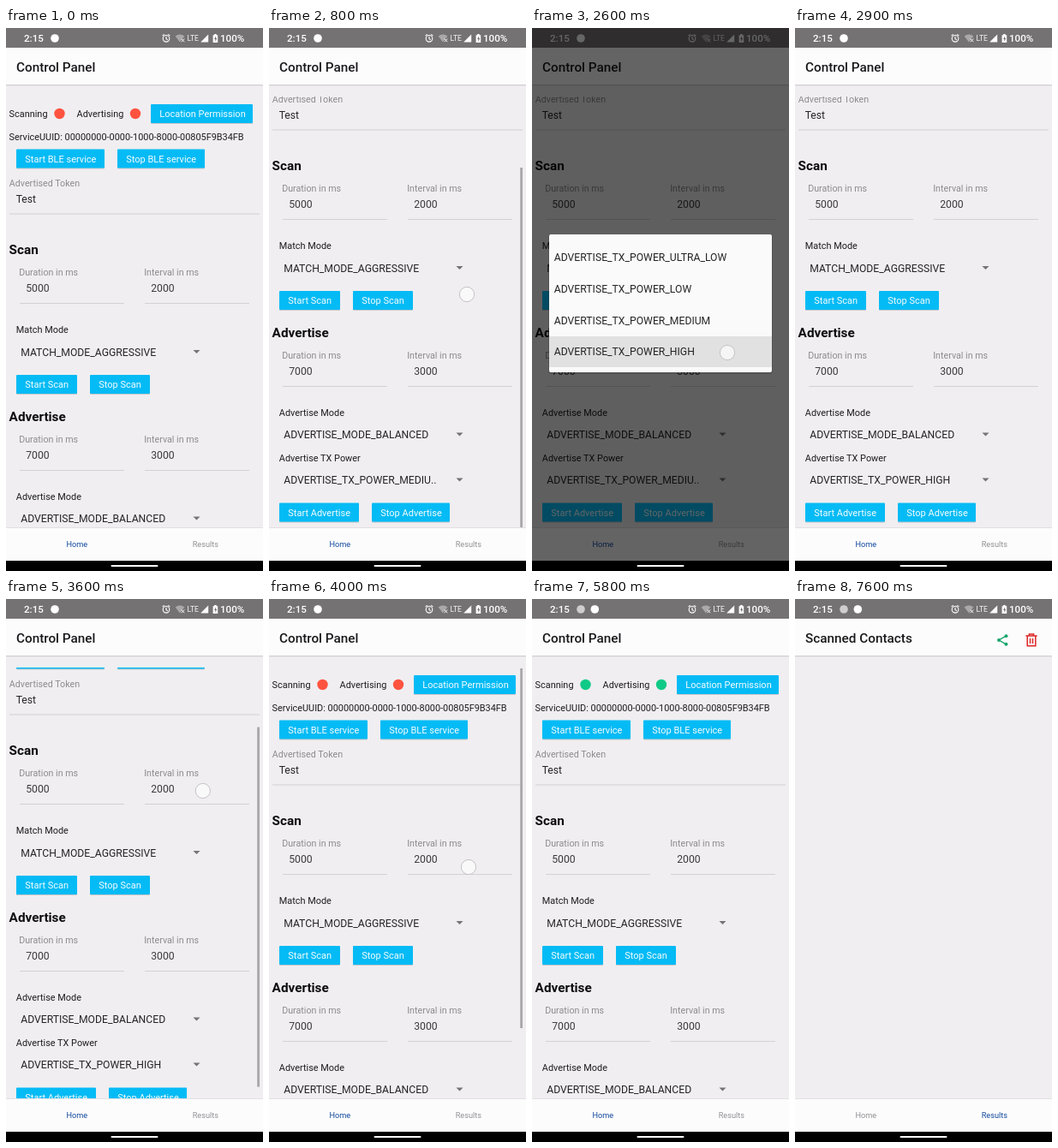
Animation, 300 px wide and 634 px high, one loop 8000 ms. Source, as an HTML page:

```html
<!DOCTYPE html>
<html lang="en">
<head>
<meta charset="utf-8">
<title>Control Panel</title>
<style>
  html, body { margin: 0; width: 100%; height: 100%; overflow: hidden; background: #f0eef1; }
  svg { display: block; width: 300px; height: 634px; font-family: Roboto, sans-serif; }
  text { white-space: pre; }
  .body { font-size: 10.9px; fill: #1d1c1d; }
  .hint { font-size: 10.7px; fill: #8d8b8e; }
  .value { font-size: 12.2px; fill: #262526; }
  .field { font-size: 12.2px; fill: #3c3b3d; }
  .head { font-size: 15.3px; font-weight: 700; fill: #0c0c0d; }
  .title { font-size: 15.3px; font-weight: 500; fill: #19181a; }
  .btn { font-size: 11px; fill: #f6fcff; }
  .nav { font-size: 9.2px; text-anchor: middle; }
  .clock { font-size: 11.6px; font-weight: 500; fill: #fff; }
</style>
</head>
<body>
<svg id="stage" viewBox="0 0 300 634"></svg>
<script>
const LOOP = 8000, STEP = 100, MAX_SCROLL = 98;
const $ = id => document.getElementById(id);

// markup helpers
const text = (cls, x, y, str, id = '') => `<text class="${cls}" x="${x}" y="${y}" id="${id}">${str}</text>`;
const rect = (x, y, w, h, fill, more = '') =>
  `<rect x="${x}" y="${y}" width="${w}" height="${h}" fill="${fill}" ${more}/>`;
const circle = (x, y, r, fill, more = '') => `<circle cx="${x}" cy="${y}" r="${r}" fill="${fill}" ${more}/>`;
const path = (d, more) => `<path d="${d}" ${more}/>`;
const line = (x, y, w) => rect(x, y, w, 1, '#d3d1d4');
const arrow = y => path(`M218.5 ${y - 2}h8l-4 4z`, 'fill="#747275"');
const button = (x, y, w, str, pad = 10.3) =>
  rect(x, y + 1, w, 22, '#000', 'rx="1" opacity=".17"') +
  rect(x, y, w, 22, '#05bbf5', 'rx="1"') + text('btn', x + pad, y + 15, str);
const fields = (y, a, b) => [[15.2, 'Duration in ms', a], [161.2, 'Interval in ms', b]].map(([x, label, val]) =>
  text('hint', x, y, label) + text('field', x + 8, y + 19.4, val) + line(x + .8, y + 32, 122)).join('');
const select = (y, label, val, id) =>
  text('body', 11.8, y, label) + text('value', 17.2, y + 26.6, val, id) + arrow(y + 22);

const form =
  text('body', 3.6, 104, 'Scanning') + circle(62.5, 100, 6.2, '', 'class="dot"') +
  text('body', 82.6, 104, 'Advertising') + circle(151, 100, 6.2, '', 'class="dot"') +
  button(169, 89, 119, 'Location Permission') +
  text('body', 3.6, 131, 'ServiceUUID: 00000000-0000-1000-8000-00805F9B34FB') +
  button(12, 141.5, 103, 'Start BLE service') + button(130, 141.5, 102, 'Stop BLE service') +
  rect(12, 141.5, 103, 22, '#fff', 'id="press"') +
  text('hint', 3.8, 185, 'Advertised Token') + text('value', 11.7, 204.4, 'Test') + line(4, 216.5, 292) +
  text('head', 3.6, 263.5, 'Scan') + fields(289, '5000', '2000') +
  select(356, 'Match Mode', 'MATCH_MODE_AGGRESSIVE') +
  button(12, 405, 71, 'Start Scan') + button(98, 405, 70, 'Stop Scan') +
  text('head', 3.6, 458.5, 'Advertise') + fields(484, '7000', '3000') +
  select(550.5, 'Advertise Mode', 'ADVERTISE_MODE_BALANCED') +
  select(603.5, 'Advertise TX Power', '', 'power') +
  button(12, 652.5, 93, 'Start Advertise') + button(120, 652.5, 91, 'Stop Advertise');

const status =
  rect(0, 0, 300, 23, '#757273') + text('clock', 21, 16, '2:15') +
  circle(57, 12, 4.8, '#cfcdce', 'id="notice"') + circle(57, 12, 4.8, '#fff', 'id="badge"') +
  `<g fill="none" stroke="#fff" stroke-width="1.1">` +
  circle(187, 12.3, 3.8, 'none') + path('M187 10v2.6l1.8 1.1M182.6 9.2l2.2-1.9M191.4 9.2l-2.2-1.9') + '</g>' +
  path('M197.6 9.6Q203 5.2 208.4 9.6L203 16.4z', 'fill="#aaa8a9"') +
  path('M204.8 12.6l3.4 3.6m0-3.6l-3.4 3.6', 'stroke="#fff" stroke-width="1"') +
  `<text x="211.5" y="15.4" font-size="8.6" fill="#f4f3f4">LTE</text>` +
  path('M236.2 7.4v9h-9z', 'fill="#fff"') +
  path('M243.2 7h2.4v1.2h1.6v8.8h-5.6V8.2h1.6z', 'fill="#fff"') +
  path('M245 9.4l-1.9 3.5h1.2v2.8l1.9-3.6h-1.2z', 'fill="#757273"') +
  text('clock', 250, 16, '100%');

const tools =
  `<g fill="#16a56c" stroke="#16a56c" stroke-width="1.4">` +
  path('M246.5 43.2L238 48l8.5 4.8', 'fill="none"') +
  [[246.5, 43.2], [238, 48], [246.5, 52.8]].map(([x, y]) => circle(x, y, 1.7, '#16a56c', 'stroke-width=".6"')).join('') + '</g>' +
  `<g fill="none" stroke="#dc2626" stroke-width="1.5">` +
  path('M269.4 43h13.2M273.4 42.6v-1.6h5.2v1.6M271.2 43.4v11.4h9.6V43.4M274.5 46v6M277.5 46v6') + '</g>';

const options = ['ULTRA_LOW', 'LOW', 'MEDIUM', 'HIGH'];
const popup =
  rect(19, 241, 262, 163, '#000', 'rx="3" opacity=".12"') + rect(20, 241, 260, 161, '#fafafa', 'rx="2"') +
  rect(20, 360, 260, 36, '#000', 'id="row"') +
  options.map((o, i) => text('value', 25.8, 272.2 + i * 36.7, 'ADVERTISE_TX_POWER_' + o)).join('');

$('stage').innerHTML =
  '<defs><clipPath id="view"><rect y="80" width="300" height="504"/></clipPath></defs>' +
  rect(0, 0, 300, 634, '#f0eef1') +
  `<g id="home"><g clip-path="url(#view)"><g id="form">${form}</g></g>` +
  rect(293.2, 81, 2.8, 420, '#a9a7aa', 'id="bar"') + '</g>' +
  rect(0, 66, 300, 1, '#d2d0d3') + rect(0, 67, 300, 1, '#e6e4e7') + rect(0, 23, 300, 43, '#fdfcfd') +
  text('title', 12, 50.5, '', 'title') + `<g id="tools">${tools}</g>` +
  rect(0, 583, 300, 1, '#e2e0e3') + rect(0, 584, 300, 38, '#fdfcfd') +
  text('nav', 82.8, 606.4, 'Home', 'tab0') + text('nav', 232.8, 606.4, 'Results', 'tab1') +
  status + circle(230, 527, 0, '#000', 'id="ripple"') +
  rect(0, 0, 300, 622, '#000', 'id="dim"') + `<g id="popup">${popup}</g>` +
  rect(0, 622, 300, 12, '#000') + rect(122.5, 627, 55, 2, '#fff', 'rx="1"') +
  circle(0, 0, 8.6, '#fff', 'id="touch" fill-opacity=".65" stroke="#c4c2c6" stroke-width="1"');

// [time, value] tables, linear between points
const tracks = {
  scroll: [[500, 0], [600, 26], [700, 70], [800, 98], [3500, 98], [3600, 82], [3700, 50], [3800, 20], [3900, 0]],
  bar: [[500, 0], [600, 1], [1300, 1], [1600, 0], [3500, 0], [3600, 1], [4700, 1], [5100, 0]],
  dim: [[1900, 0], [2000, .2], [2100, .45], [2200, .6], [2600, .6], [2700, .52], [2800, .2], [2900, 0]],
  popup: [[1900, 0], [2000, .6], [2100, 1], [2700, 1], [2800, .35], [2900, 0]],
  row: [[2500, 0], [2600, .1], [2700, .1], [2800, 0]],
  ripple: [[1600, 0], [1700, .14], [2000, .2], [2200, 0]],
  rippleSize: [[1600, 4], [1900, 18]],
  press: [[5200, 0], [5300, .3], [5500, .2], [5700, 0]]
};
// each touch: start, end, x track, y track
const touches = [
  [500, 1100, [[500, 226], [800, 231]], [[500, 432], [600, 398], [700, 348], [800, 311], [1000, 296]]],
  [1600, 1800, [[0, 230]], [[0, 527]]],
  [2600, 2700, [[0, 228]], [[0, 379]]],
  [3500, 4300, [[3500, 229], [4000, 233]], [[3500, 198], [3700, 250], [3900, 302], [4000, 313], [4200, 320]]],
  [5300, 5500, [[0, 74]], [[0, 156]]],
  [7000, 7200, [[0, 234]], [[0, 604]]]
];

function at(track, t) {
  const i = track.findIndex(p => p[0] > t);
  if (i === 0) return track[0][1];
  if (i < 0) return track[track.length - 1][1];
  const [t0, a] = track[i - 1], [t1, b] = track[i];
  return a + (b - a) * (t - t0) / (t1 - t0);
}
const set = (id, name, val) => $(id).setAttribute(name, val);
const dots = document.querySelectorAll('.dot');

function render(t) {
  const v = name => at(tracks[name], t);
  const results = t >= 7300, running = t >= 5500, noticed = t >= 5600;
  const scroll = v('scroll');
  set('form', 'transform', `translate(0 ${-scroll})`);
  set('bar', 'y', 81 + 82 * scroll / MAX_SCROLL);
  for (const id of ['bar', 'dim', 'popup', 'row', 'ripple', 'press']) set(id, 'opacity', v(id));
  set('ripple', 'r', v('rippleSize'));
  set('home', 'opacity', results ? 0 : 1);
  set('tools', 'opacity', results ? 1 : 0);
  set('notice', 'opacity', noticed ? 1 : 0);
  set('badge', 'cx', noticed ? 73.3 : 57);
  set('tab0', 'fill', results ? '#929093' : '#124a9c');
  set('tab1', 'fill', results ? '#124a9c' : '#929093');
  dots.forEach(d => d.setAttribute('fill', running ? '#0fca86' : '#ff5340'));
  $('title').textContent = results ? 'Scanned Contacts' : 'Control Panel';
  $('power').textContent = 'ADVERTISE_TX_POWER_' + (t >= 2800 ? 'HIGH' : 'MEDIU..');
  const touch = touches.find(([a, b]) => t >= a && t < b);
  set('touch', 'opacity', touch ? 1 : 0);
  if (touch) {
    set('touch', 'cx', at(touch[2], t));
    set('touch', 'cy', at(touch[3], t));
  }
}

const start = performance.now();
function tick() {
  const t = (performance.now() - start) % LOOP;
  render(Math.floor(t / STEP) * STEP);
  requestAnimationFrame(tick);
}
tick();
</script>
</body>
</html>
```
